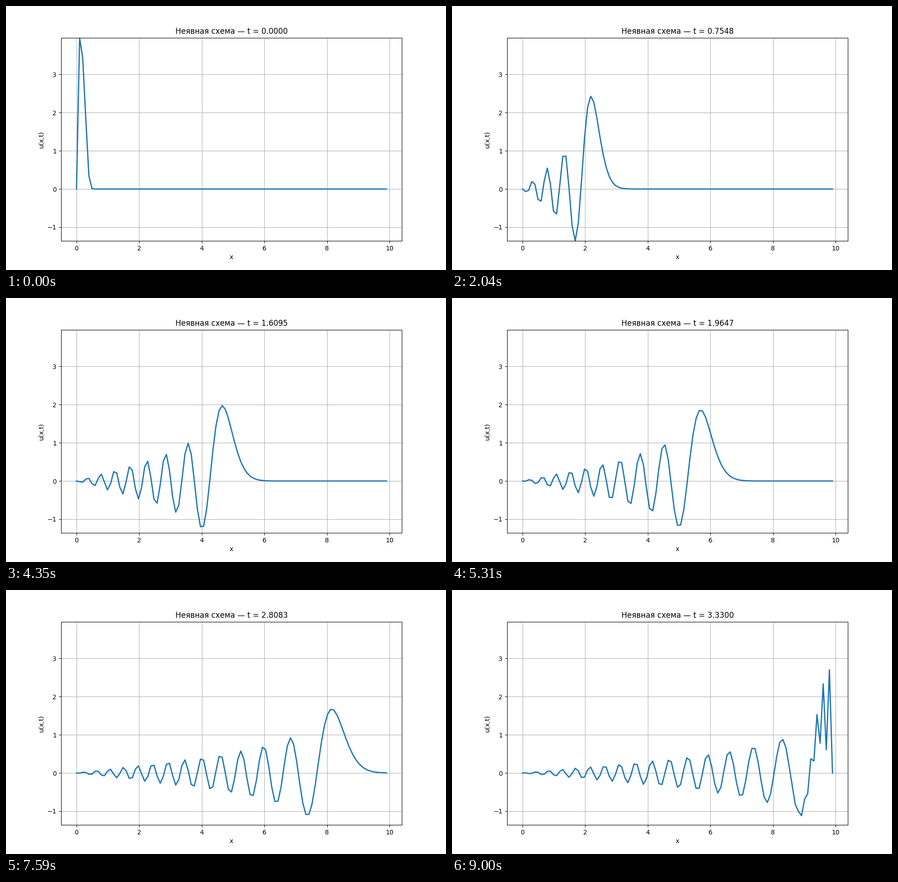
A matplotlib script for the animation above (9.03 s loop, 966 by 580 pixels).

```python
import matplotlib.pyplot as plt
import numpy as np
from matplotlib.animation import FuncAnimation

FRAMES, INTERVAL = 301, 30
LENGTH, CELLS = 9.9, 100
SPEED = 2.97
DT = 1.11e-4
SUBSTEPS = 100


def solve():
    """Transport equation: backward Euler in time, central differences in space."""
    x = np.linspace(0, LENGTH, CELLS + 1)
    r = SPEED * DT / (2 * (x[1] - x[0]))
    inner = np.eye(CELLS - 1) + r * np.eye(CELLS - 1, k=1) - r * np.eye(CELLS - 1, k=-1)
    step = np.linalg.inv(inner)

    u = np.zeros(((FRAMES - 1) * SUBSTEPS + 1, CELLS + 1))
    u[0, 1:-1] = 4 * np.exp(-100 * x[1:-1] ** 4)
    for n in range(len(u) - 1):
        u[n + 1, 1:-1] = step @ u[n, 1:-1]
    return x, u


x, u = solve()

fig, ax = plt.subplots(figsize=(9.66, 5.8), dpi=100)
line, = ax.plot(x, u[0], lw=2)
ax.set_xlim(-0.05 * LENGTH, 1.05 * LENGTH)
ax.set_ylim(u.min(), u.max())
ax.set_xlabel("x")
ax.set_ylabel("u(x,t)")
ax.grid(True)
title = ax.set_title("")


def update(frame):
    n = frame * SUBSTEPS
    line.set_ydata(u[n])
    title.set_text(f"Неявная схема — t = {n * DT:.4f}")
    return line, title


anim = FuncAnimation(fig, update, frames=FRAMES, interval=INTERVAL,
                     repeat=True, repeat_delay=0, blit=False)
plt.show()
```
